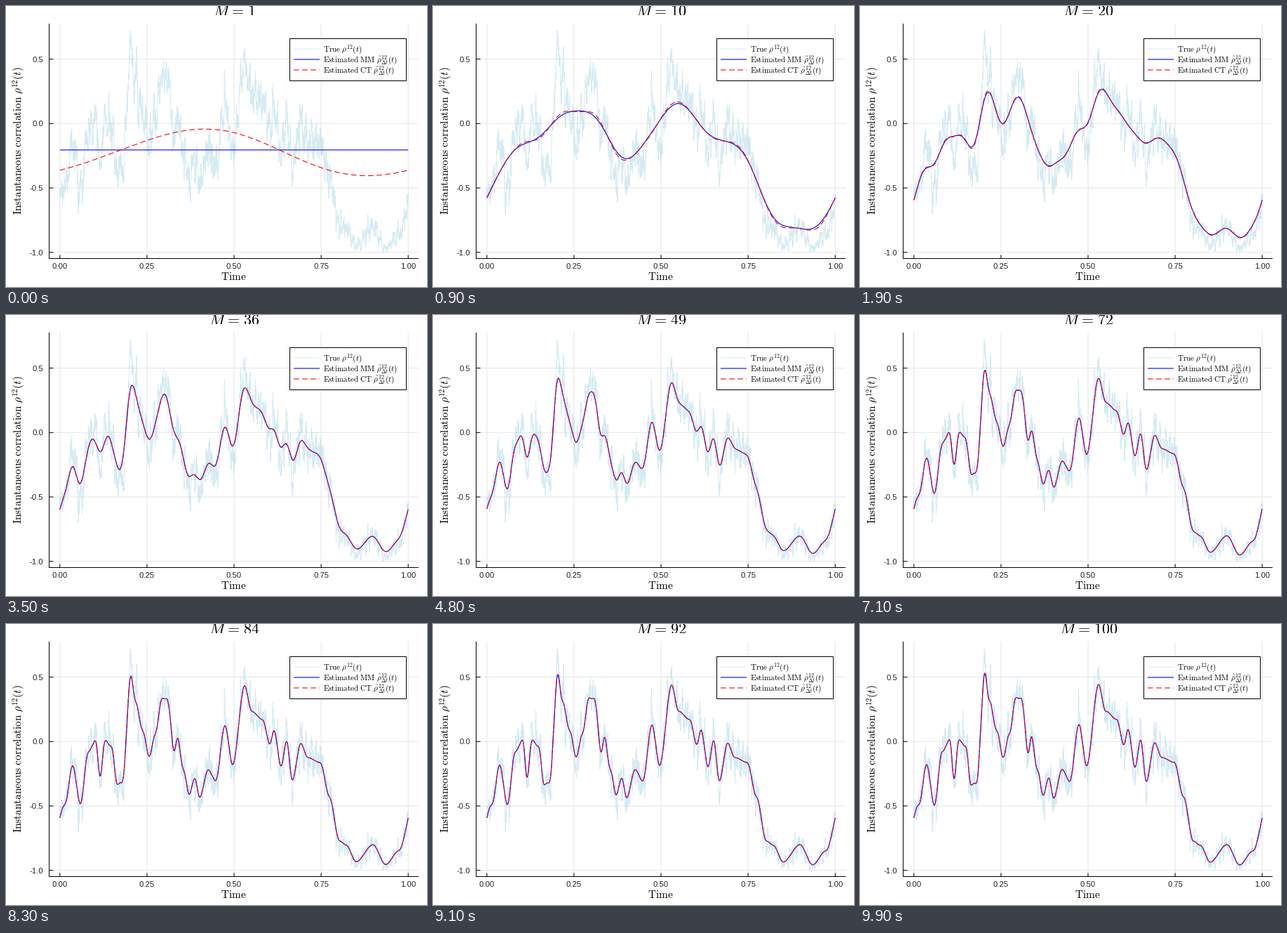
Recreate the animation shown at these times as a matplotlib script. Size 600 px wide and 400 px high, loop 10000 ms.

```python
import numpy as np
import matplotlib.pyplot as plt
from matplotlib.animation import FuncAnimation
from matplotlib.patches import Rectangle

W, H, DPI = 600, 400, 100
LEFT, RIGHT, TOP, BOTTOM = 61.5, 588, 25, 359.5
X0, PERIOD = 76.8, 496.4          # time 0 and length of [0, 1] in pixels
Y0, UNIT = 167.3, 183.4           # zero correlation and one unit in pixels
MODES = 100
PT = 72 / DPI

plt.rcParams.update({"font.family": "Liberation Sans", "mathtext.fontset": "cm"})

# Main turning points of the correlation, in pixels.
KNOTS = np.array([
    (84, 257), (95, 200), (106, 258), (117, 182), (128, 165), (134, 220),
    (141, 165), (151, 175), (158, 229), (166, 226), (178, 70), (184, 108),
    (195, 152), (204, 190), (213, 156), (222, 105), (230, 106), (240, 184),
    (244, 160), (253, 208), (261, 244), (269, 219), (276, 248), (288, 207),
    (299, 224), (312, 143), (323, 202), (340, 86), (350, 124), (366, 136),
    (376, 172), (382, 150), (392, 204), (400, 165), (408, 224), (420, 169),
    (430, 190), (448, 197), (461, 246), (475, 309), (485, 315), (499, 339),
    (523, 314), (541, 343), (560, 323),
])


def eased_curve(x):
    """Periodic curve with smoothstep easing between the knots."""
    xs, ys = np.vstack([KNOTS, KNOTS[0] + [PERIOD, 0]]).T
    pos = np.interp(x, xs, np.arange(len(xs)))
    i = np.minimum(pos.astype(int), len(xs) - 2)
    u = pos - i
    return ys[i] + (ys[i + 1] - ys[i]) * u * u * (3 - 2 * u)


K = np.arange(MODES + 1)


def fourier_coefs(n=2048):
    """One-sided coefficients whose last Fejer sum follows the knots."""
    start = KNOTS[0, 0]
    c = np.fft.rfft(eased_curve(start + PERIOD * np.arange(n) / n))[K] / n
    c *= np.exp(2j * np.pi * K * (X0 - start) / PERIOD)
    c[1:] *= 2
    return c / np.maximum(1 - K / (MODES + 0.5), 0.3)


def harmonics(t):
    return np.exp(2j * np.pi * np.outer(t, K))


T = np.linspace(0, 1, 1200)
COEFS, BASIS = fourier_coefs(), harmonics(T)


def fejer(order, basis=BASIS):
    return (basis @ (COEFS * np.clip(1 - K / order, 0, 1))).real


# Bias of the coarsest estimates, fading quickly with M.
first = -0.227 + 0.18 * np.cos(2 * np.pi * (T - 0.4)) + 0.01 * np.cos(4 * np.pi * T)
CT_BIAS = Y0 - UNIT * first - fejer(2)
MM_BIAS = Y0 + UNIT * 0.205 - fejer(1)


def true_path(n=6000, cutoff=60):
    """Sharp curve plus Brownian noise that holds only fast modes."""
    rng = np.random.default_rng(12)
    t = np.arange(n) / n
    y = fejer(250, harmonics(t))
    k = np.arange(n // 2 + 1)
    spectrum = rng.normal(size=(2, len(k))) * (k > cutoff) / np.maximum(k, 1)
    noise = np.fft.irfft(spectrum[0] + 1j * spectrum[1], n)
    rho = (Y0 - y) / UNIT
    y += 15 * np.clip(1 - rho ** 2, 0.05, 1) ** 0.6 * noise / noise.std()
    return X0 + PERIOD * t, np.clip(y, 34, 352)


fig = plt.figure(figsize=(W / DPI, H / DPI), dpi=DPI, facecolor="white")
ax = fig.add_axes([0, 0, 1, 1])
ax.set(xlim=(0, W), ylim=(H, 0))
ax.axis("off")


def line(x, y, color="black", width=1, **kw):
    return ax.plot(x, y, color=color, lw=width * PT, solid_capstyle="butt",
                   dash_capstyle="butt", snap=False, **kw)[0]


def label(x, y, s, px, **kw):
    return ax.text(x, y, s, fontsize=px * PT, **{"va": "baseline", **kw})


TRUE = dict(color="lightblue", alpha=0.5)
MM = dict(color="blue", width=1.1)
CT = dict(color="red", width=1.1, linestyle=(0, (7, 4)))
TICK = dict(px=11.2, color="#222222")

# Grid, axes and ticks
for v in np.linspace(0, 1, 5):
    x = X0 + PERIOD * v
    line([x, x], [TOP, BOTTOM], "#e5e5e5", zorder=1)
    line([x, x], [BOTTOM, BOTTOM - 5], zorder=4)
    label(x, 374, f"{v:.2f}", ha="center", **TICK)
for v in np.arange(-1, 1, 0.5):
    y = Y0 - UNIT * v
    line([LEFT, RIGHT], [y, y], "#e5e5e5", zorder=1)
    line([LEFT, LEFT + 6], [y, y], zorder=4)
    label(53.5, y + 4, f"{v:.1f}", ha="right", **TICK)
line([LEFT, LEFT], [TOP, BOTTOM + 0.5], zorder=4)
line([LEFT, RIGHT], [BOTTOM, BOTTOM], zorder=4)

label(324.5, 390, r"$\mathrm{Time}$", 15.3, ha="center")
label(24, 192, r"$\mathrm{Instantaneous\ correlation}\ \rho^{12}(t)$", 15.2,
      ha="center", rotation=90, rotation_mode="anchor")

# Curves
line(*true_path(), zorder=2, **TRUE)
px = X0 + PERIOD * T
mm = line(px, px, zorder=3, **MM)
ct = line(px, px, zorder=3.1, **CT)

# Legend
ax.add_patch(Rectangle((403.5, 45.5), 166, 60, fc="white", ec="black",
                       lw=PT, zorder=5))
entries = [
    (TRUE, r"$\mathrm{True}\ \rho^{12}(t)$"),
    (MM, r"$\mathrm{Estimated\ MM}\ \hat{\rho}^{12}_{\Delta t}(t)$"),
    (CT, r"$\mathrm{Estimated\ CT}\ \hat{\rho}^{12}_{\Delta t}(t)$"),
]
for i, (style, s) in enumerate(entries):
    y = 61 + 15 * i
    line([410, 447], [y, y], zorder=6, **style)
    label(452, y + 3.2, s, 11.1, zorder=6)

# The title is cut off just above its baseline.
title = label(325.5, 14.3, "", 22, ha="center", zorder=5)
ax.add_patch(Rectangle((200, 13), 250, 11, fc="white", ec="none", zorder=6))


def update(frame):
    m = frame + 1
    mm.set_ydata(fejer(m) + MM_BIAS / m ** 2)
    ct.set_ydata(fejer(m + 1) + CT_BIAS / m ** 2)
    title.set_text(rf"$M\hspace{{0.08}} = \hspace{{0.08}}{m}$")
    return mm, ct, title


anim = FuncAnimation(fig, update, frames=100, interval=100, repeat=True,
                     repeat_delay=0, blit=False)
plt.show()
```
